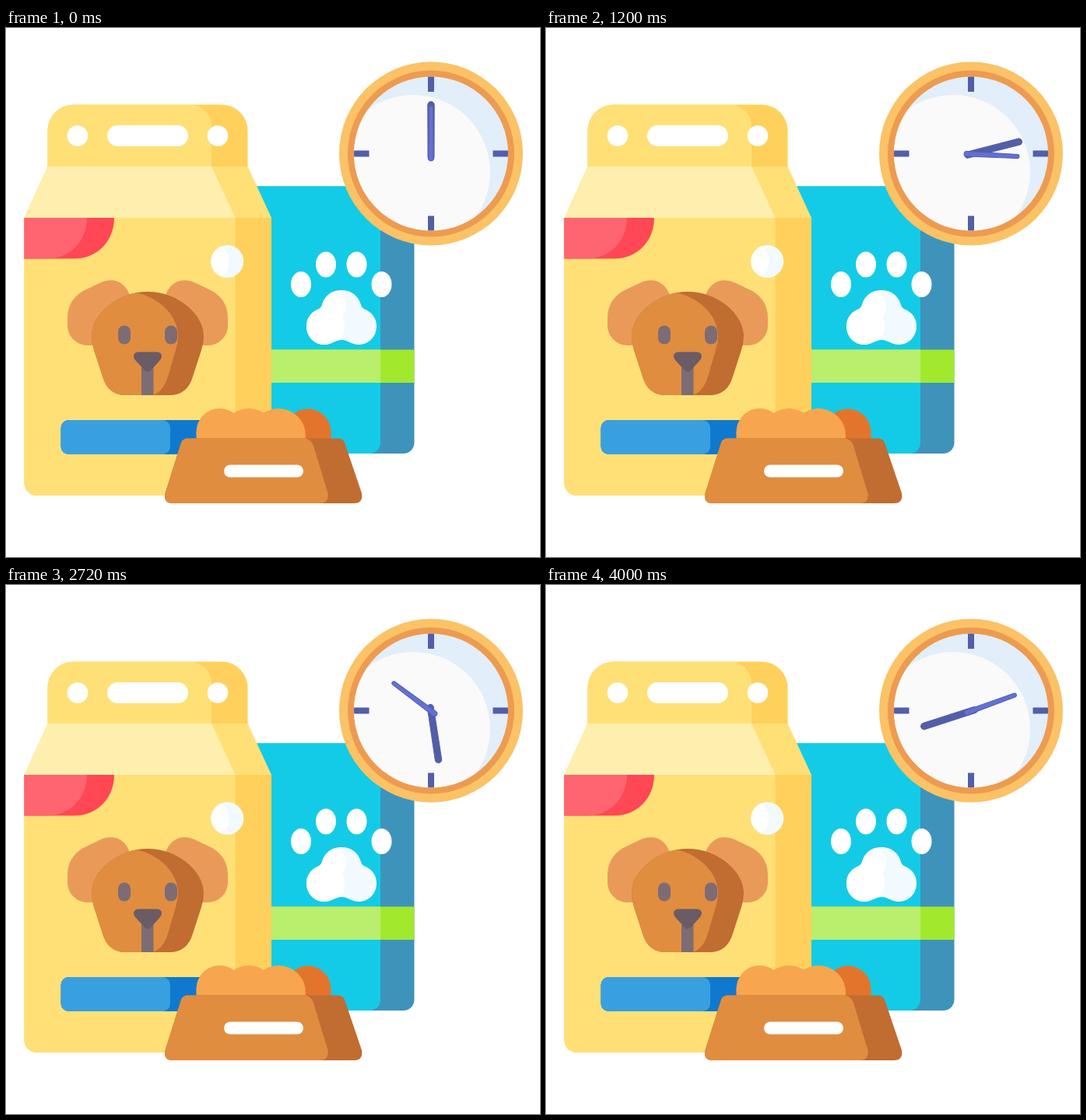
Recreate the animation shown at these times as an HTML page with a canvas. Size 686x680 px, loop 4.04 s.

```html
<!DOCTYPE html>
<html lang="en">
<head>
<meta charset="utf-8">
<title>Feeding time</title>
<style>
  html, body { margin: 0; width: 100%; height: 100%; overflow: hidden; background: #fff; }
  canvas { display: block; }
</style>
</head>
<body>
<canvas id="stage" width="686" height="680"></canvas>
<script>
const ctx = document.getElementById('stage').getContext('2d');
const LOOP = 4040, STEP = 40;
const HOUR_SPEED = 2.52, MINUTE_SPEED = 15.1; // degrees per step

const C = {
  yellow: '#ffe077', amber: '#ffd05b', cream: '#ffefae',
  tan: '#e08d40', brown: '#c16c31', ear: '#ea9a58',
  teal: '#13cbe6', steel: '#3e93bb', ice: '#f2faff',
  grey: '#7d6c74', navy: '#525ea8', hand: '#6470d2'
};

function fill(d, color) {
  ctx.fillStyle = color;
  ctx.fill(new Path2D(d));
}

function rect(x, y, w, h, color, r = 0) {
  ctx.fillStyle = color;
  ctx.beginPath();
  ctx.roundRect(x, y, w, h, r);
  ctx.fill();
}

function oval(x, y, rx, color, ry = rx) {
  ctx.fillStyle = color;
  ctx.beginPath();
  ctx.ellipse(x, y, rx, ry, 0, 0, Math.PI * 2);
  ctx.fill();
}

function clipped(path, draw) {
  ctx.save();
  ctx.clip(path);
  draw();
  ctx.restore();
}

function disc(x, y, r) {
  const p = new Path2D();
  p.arc(x, y, r, 0, Math.PI * 2);
  return p;
}

function paw() {
  for (const [x, y] of [[379, 329.5], [411, 304], [450.5, 304], [482.5, 329.5]]) {
    oval(x, y, 13, '#fff', 16.5);
  }
  const pad = new Path2D('M431 337C443 337 453 344 456 356Q457 360 462 362' +
    'C471 366 476 374 476 383C476 397 466 407 453 407C443 407 440 401 431 401' +
    'C422 401 419 407 409 407C396 407 386 397 386 383C386 374 391 366 400 362' +
    'Q405 360 406 356C409 344 419 337 431 337Z');
  clipped(pad, () => {
    rect(380, 330, 100, 80, C.ice);
    oval(410, 383, 25, '#fff', 26);
    oval(420, 357, 17, '#fff', 20);
  });
}

function blueBag() {
  rect(300, 203.5, 224.5, 343.5, C.steel, [0, 0, 14, 0]);
  rect(300, 203.5, 181, 343.5, C.teal, [0, 0, 14, 0]);
  rect(320, 413.5, 204.5, 42.5, '#a2e92e');
  rect(320, 413.5, 161, 42.5, '#baee6d');
  paw();
}

function hand(angle, tip, tail, tipR, tailR, color, edge) {
  ctx.save();
  ctx.translate(546, 162);
  ctx.rotate(angle * Math.PI / 180);
  ctx.beginPath();
  ctx.arc(0, tipR - tip, tipR, Math.PI, 0);
  ctx.arc(0, tail - tailR, tailR, 0, Math.PI);
  ctx.closePath();
  ctx.fillStyle = color;
  ctx.fill();
  ctx.strokeStyle = edge;
  ctx.lineWidth = 1;
  ctx.stroke();
  ctx.restore();
}

function clock(step) {
  oval(546, 161.5, 118, '#fbc266');
  oval(546, 161.5, 107, '#ed9b50');
  clipped(disc(546, 161.5, 99), () => {
    rect(440, 55, 212, 212, '#e2eefa');
    oval(523, 185, 99, '#fafafa');
    rect(542, 60, 8, 22, C.navy);
    rect(542, 241.5, 8, 22, C.navy);
    rect(444, 157.5, 22.5, 8, C.navy);
    rect(625.5, 157.5, 22, 8, C.navy);
  });
  hand(step * HOUR_SPEED, 67.5, 8.5, 4.2, 4, C.navy, C.navy);
  hand(step * MINUTE_SPEED, 62, 9, 2.5, 3.3, C.hand, '#5560b8');
}

function ear() {
  fill('M160 346C154 326 138 320 122 327L99 338Q79 350 79 373V382' +
    'A25.5 25.5 0 0 0 104.500 408H120L150 360Z', C.ear);
}

function dog(open) {
  ear();
  ctx.save();
  ctx.translate(364, 0);
  ctx.scale(-1, 1);
  ear();
  ctx.restore();

  const head = new Path2D('M182 339C143 339 110 368 110 396Q110 405 113 414L124 448' +
    'Q131 472 154 472H210Q233 472 240 448L251 414Q254 405 254 396C254 368 221 339 182 339Z');
  clipped(head, () => {
    rect(105, 335, 155, 140, C.brown);
    fill('M100 330H150L167 340C198 347 221 370 221 396Q221 405 218 414' +
      'L208 448Q202 468 188 472V480H100Z', C.tan);
  });

  for (const x of [152, 212]) {
    ctx.save();
    ctx.translate(x, 394.5);
    ctx.scale(1, open);
    rect(-8, -12, 16, 24, C.grey, 8);
    ctx.restore();
  }
  rect(174, 432, 15.5, 40, C.grey);
  fill('M170 416.500H194Q200 417 200 422Q200 425 197 428L186 440Q182 444 178 440' +
    'L167 428Q164 425 164 422Q164 417 170 416.500Z', '#6a5b65');
}

function yellowBag(open) {
  const top = new Path2D('M53.500 178.500V132A33.500 33.500 0 0 1 87 98.500H277' +
    'A33.500 33.500 0 0 1 310.500 132V178.500Z');
  clipped(top, () => {
    rect(50, 95, 265, 85, C.amber);
    rect(20, 98.5, 244, 90, C.yellow, [0, 28, 0, 0]);
  });
  oval(92, 138.5, 13.3, '#fff');
  oval(272, 138.5, 13.3, '#fff');
  rect(130, 125, 104, 27, '#fff', 13.5);

  rect(23.5, 243.5, 317.5, 357.5, C.amber, [0, 0, 16, 16]);
  rect(23.5, 243.5, 271, 357.5, C.yellow, [0, 0, 0, 16]);
  fill('M53.500 178H310.500L341 244H23.500Z', C.yellow);
  fill('M53.500 178H264L294.500 244H23.500Z', C.cream);

  fill('M23.500 244H139C139 274 117 296.500 88 296.500H23.500Z', '#ff4755');
  fill('M23.500 244H104C104 274 82 296.500 53 296.500H23.500Z', '#ff6570');

  oval(284.3, 300, 21, C.ice);
  clipped(disc(284.3, 300, 21), () => oval(268, 300, 18.5, '#fff', 22));

  dog(open);
  rect(70.5, 504, 200, 44, '#0f79d0', 10);
  rect(70.5, 504, 140.5, 44, '#39a0df', 10);
}

function bowl() {
  oval(388, 519, 29.5, '#e2752b');
  rect(385, 519, 32.5, 12, '#e2752b');
  const food = '#f7a54e';
  oval(274.5, 519, 30, food);
  oval(312, 524, 35, food);
  oval(350, 524, 35, food);
  rect(244.5, 519, 30, 12, food);

  fill('M234 527.500H426Q433 527.500 435 533L457 598Q459 611 447 611H214' +
    'Q202 611 204.500 598L225 533Q227 527.500 234 527.500Z', C.brown);
  fill('M234 527.500H382Q392 527.500 395 537L413.500 598Q415 611 403 611H214' +
    'Q202 611 204.500 598L225 533Q227 527.500 234 527.500Z', C.tan);
  rect(280, 561.5, 102, 16, '#fff', 8);
}

// The eyes shut for a moment every 1600 ms.
function eyeOpen(t) {
  const away = Math.abs((t + 180) % 1600 - 800);
  return 1 - 0.9 * Math.max(0, 1 - away / 100);
}

function draw(now) {
  const step = Math.floor((now % LOOP) / STEP);
  ctx.clearRect(0, 0, 686, 680);
  blueBag();
  clock(step);
  yellowBag(eyeOpen(step * STEP));
  bowl();
  requestAnimationFrame(draw);
}

draw(0);
</script>
</body>
</html>
```
